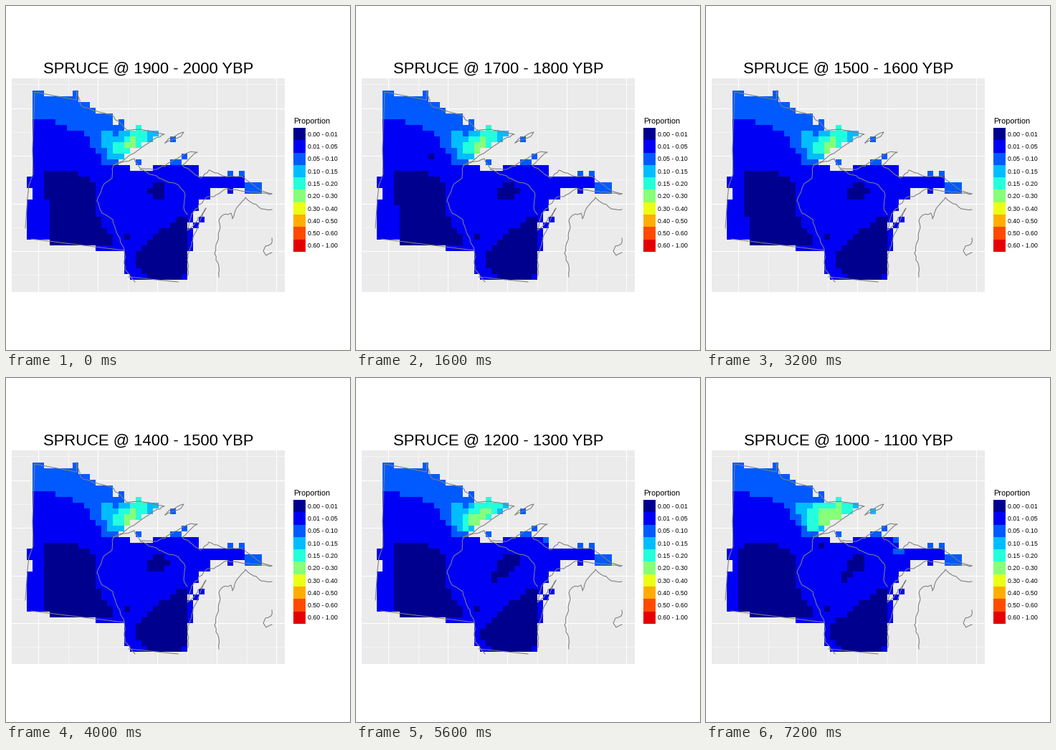
Write a matplotlib script that moves like this. It is 480 px wide and 480 px high and loops after 8000 ms.

```python
import numpy as np
import matplotlib.pyplot as plt
from matplotlib.animation import FuncAnimation
from matplotlib.colors import ListedColormap
from matplotlib.patches import Rectangle

SIZE, DPI = 480, 80
PX = 72 / DPI          # points per pixel
CELL, LEFT, TOP = 8, 29, 118
ROWS, COLS = 33, 41
STEPS, STEP_MS = 10, 800

COLORS = ["#00008F", "#0000F5", "#005AFF", "#00BDFF", "#23FFDC",
          "#87FF78", "#ECFF13", "#FFAD00", "#FF4A00", "#E40000"]
BREAKS = [0, .01, .05, .1, .15, .2, .3, .4, .5, .6, 1]


def land_mask():
    mask = np.zeros((ROWS, COLS), bool)
    ends = [3, 9, 11, 12, 15, 15, 17, 23, 22, 20, 18, 17, 16, 18, 30, 38,
            38, 32, 32, 30, 30]
    for r in range(ROWS):
        end = ends[r] if r < len(ends) else 29 - (r == 23 or r > 27)
        mask[r, 1:end] = True
    mask[15:17, 0] = mask[19:26, 0] = True
    # south-western edge
    for r, first in ((26, 4), (27, 12), (28, 17), (32, 18)):
        mask[r:, :first] = False
    # detached cells and islands
    for r, c in ((0, 8), (5, 16), (6, 19), (8, 25), (11, 27), (12, 19),
                 (14, 35), (14, 37), (17, 35), (22, 30), (23, 29)):
        mask[r, c] = True
    mask[12, 25:27] = mask[13, 22:30] = mask[16:18, 38:] = True
    return mask


LAND = land_mask()


def paint(grid, cls, row, c0, c1, height=1):
    block = grid[row:row + height, c0:c1]
    block[LAND[row:row + height, c0:c1]] = cls


def stairs(grid, cls, row, starts, ends):
    """Paint one span per row; a single start or end serves all rows."""
    n = max(np.size(starts), np.size(ends))
    spans = zip(np.broadcast_to(starts, n), np.broadcast_to(ends, n))
    for r, (a, b) in enumerate(spans, row):
        paint(grid, cls, r, a, b)


def first_grid():
    g = np.where(LAND, 1.0, np.nan)
    paint(g, 2, 0, 0, 20, 5)
    stairs(g, 2, 5, [5, 7, 10, 11, 11, 12, 13, 13], 29)
    paint(g, 2, 14, 35, 38)
    paint(g, 2, 16, 38, 41, 2)
    stairs(g, 3, 7, [13, 13, 13, 14, 14], [15, 22, 17, 17, 17])
    paint(g, 3, 7, 16, 23)
    stairs(g, 4, 6, [19, 18, 17, 15, 15], [20, 21, 21, 20, 18])
    stairs(g, 5, 8, [18, 17], 19)
    # western prairie
    stairs(g, 0, 14, 4, [9, 11, 12, 12, 12, 12, 12, 12, 13, 13, 14, 15, 15])
    paint(g, 0, 14, 3, 4, 5)
    # south-east and central patches
    stairs(g, 0, 22, [26, 25, 23, 22, 21, 20, 19, 19, 19, 20], 28)
    paint(g, 0, 32, 21, 27)
    paint(g, 0, 25, 17, 18)
    stairs(g, 0, 16, [22, 21, 22], 24)
    return g


def changes(n):
    """Yield the cells repainted on step n: class, row, columns, height."""
    if n < 6:              # prairie edge creeps south
        yield 0, 14, 3, 4, min(4 + n, 7) if n < 5 else 12
    if n == 1:
        yield 5, 10, 17, 18
        yield 4, 8, 16, 17
    elif n == 2:
        yield 1, 6, 7, 8
        yield 0, 11, 9, 10
        yield 0, 17, 24, 25
        yield 0, 18, 21, 22
    elif n == 3:
        yield 1, 11, 9, 10
    elif n == 4:
        yield 0, 14, 3, 4, 8
    elif n == 6:
        yield 0, 19, 20, 21, 2
        yield 0, 29, 18, 19, 2
        yield 0, 31, 19, 20
        yield 2, 13, 29, 30
        yield 2, 15, 29, 30
        yield 4, 7, 17, 22
        yield 5, 8, 18, 20
        yield 5, 9, 16, 19
        yield 5, 10, 16, 18
        yield 4, 11, 15, 16
        yield 3, 10, 13, 15
    elif n == 7:
        yield 1, 15, 29, 30
        yield 0, 16, 24, 25
        yield 0, 19, 20, 23
        yield 0, 32, 20, 21
        yield 2, 5, 4, 5
    elif n == 8:
        yield 0, 16, 2, 3, 10
        yield 0, 14, 16, 17
        yield 1, 19, 21, 23
        yield 1, 16, 24, 25, 2
        yield 2, 15, 29, 31
        yield 0, 27, 19, 20
        yield 0, 28, 18, 19
        yield 3, 7, 12, 15, 2
        yield 4, 8, 15, 22
        yield 5, 8, 16, 20, 2
        yield 4, 9, 14, 16, 3
    elif n == 9:
        yield 0, 15, 2, 3
        yield 0, 19, 20, 22
        yield 3, 8, 25, 26
        yield 4, 7, 15, 18
        yield 5, 7, 19, 20
        yield 4, 8, 14, 16


def all_grids():
    grids = [first_grid()]
    for n in range(1, STEPS):
        grid = grids[-1].copy()
        for change in changes(n):
            paint(grid, *change)
        grids.append(grid)
    return grids


def roughen(points, rng, step=4, amount=0.6):
    """Subdivide a polyline and nudge the inner points."""
    out = [np.array(points[0], float)]
    for p, q in zip(points, points[1:]):
        p, q = np.array(p, float), np.array(q, float)
        n = max(1, int(np.hypot(*(q - p)) / step))
        for k in range(1, n):
            out.append(p + (q - p) * k / n + rng.normal(0, amount, 2))
        out.append(q)
    return np.array(out)


fig = plt.figure(figsize=(SIZE / DPI, SIZE / DPI), dpi=DPI, facecolor="white")
ax = fig.add_axes([0, 0, 1, 1])
ax.axis("off")
rng = np.random.default_rng(4)


def text(x, y, s, size, **kw):
    return ax.text(x, y, s, fontsize=size * PX, family="Liberation Sans",
                   color="black", va="baseline", **kw)


def border(*points, rough=0.6):
    line = roughen(points, rng, amount=rough)
    ax.plot(*line.T, color="#7F7F7F", lw=1.07 * PX, zorder=3)


# Panel and gridlines
X0, Y0, X1, Y1 = 8, 101, 389, 399
ax.add_patch(Rectangle((X0, Y0), X1 - X0, Y1 - Y0, fc="#EBEBEB", lw=0))
for k in range(9):
    widths = [1.07 * PX, 0.53 * PX]
    x, y = 45 + 41.5 * k, 109.3 + 33.25 * k
    ax.plot([x, x], [Y0, Y1], color="white", lw=widths[k % 2], zorder=1)
    ax.plot([X0, X1], [y, y], color="white", lw=widths[1 - k % 2], zorder=1)

grids = all_grids()
tiles = ax.imshow(grids[0], cmap=ListedColormap(COLORS), vmin=-0.5, vmax=9.5,
                  extent=(LEFT, LEFT + COLS * CELL, TOP + ROWS * CELL, TOP),
                  interpolation="nearest", aspect="auto", zorder=2)

# State lines
border((27, 310), (30, 268), (32, 250), (38, 234), (37, 200), (40, 120),
       (98, 131), (99, 118), rough=0)
border((35, 325), (165, 341), rough=0)
border((171, 378), (240, 385), rough=0)
# northern border and lake shore
border((99, 118), (105, 139), (130, 148), (147, 152), (168, 173), (188, 172),
       (221, 179), (206, 186), (168, 212), (150, 222))
# river border
border((150, 222), (148, 240), (137, 248), (127, 272), (134, 289), (149, 298),
       (153, 312), (165, 341), (166, 368), (180, 385))
border((187, 228), (225, 245), (241, 250), (250, 264), (248, 281), (253, 291))
# southern shore of the upper lake
border((150, 222), (179, 213), (188, 227), (210, 228), (239, 213), (253, 205),
       (267, 204), (246, 222), (271, 240), (283, 229), (307, 238), (329, 238),
       (357, 258), (371, 262))
# western shore of the lower lake
border((371, 262), (305, 256), (290, 266), (281, 266), (259, 290), (253, 313),
       (262, 306), (279, 282), (263, 318), (253, 354), (254, 376))
border((222, 191), (231, 183), (248, 176), (244, 182), (222, 191))
# eastern peninsula
border((297, 378), (297, 363), (291, 345), (299, 309), (297, 300), (302, 292),
       (314, 289), (316, 297), (321, 283), (334, 267), (342, 274), (356, 283),
       (371, 284))
border((371, 324), (370, 332), (362, 335), (359, 342), (363, 348), (371, 344))

# Legend
KEY = 17.28
text(401, 164.5, "Proportion", 11)
for i, color in enumerate(COLORS):
    y = 170 + i * KEY
    ax.add_patch(Rectangle((401, y), KEY, KEY, fc=color, lw=0))
    text(421, y + KEY / 2 + 3.2, f"{BREAKS[i]:.2f} - {BREAKS[i + 1]:.2f}", 8.8)

title = text(198.5, 94, "", 22, ha="center")
ax.set_xlim(0, SIZE)
ax.set_ylim(SIZE, 0)


def draw(n):
    start = 1900 - 100 * n
    title.set_text(f"SPRUCE @ {start} - {start + 100} YBP")
    tiles.set_data(np.ma.masked_invalid(grids[n]))
    return title, tiles


anim = FuncAnimation(fig, draw, frames=STEPS, interval=STEP_MS, repeat=True,
                     repeat_delay=0, blit=False)
plt.show()
```
